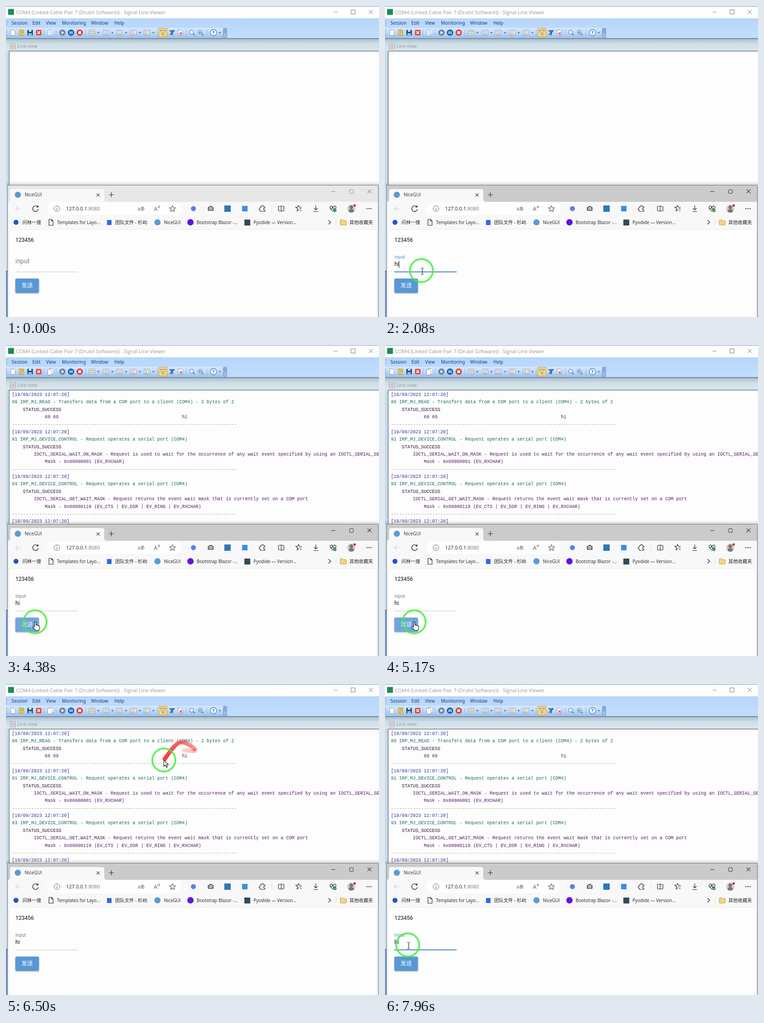
Animation of 820 by 683 pixels, one loop 8000 ms. Source, as an HTML page with a canvas:

```html
<!DOCTYPE html>
<html lang="en">
<head>
<meta charset="utf-8">
<title>Serial demo</title>
<style>
html, body { margin: 0; width: 100%; height: 100%; overflow: hidden; background: #fdfdfd; }
svg, canvas { position: absolute; left: 0; top: 0; width: 820px; height: 683px; display: block; }
text { white-space: pre; }
.ui { font-family: "Open Sans", "Noto Sans CJK SC", "Noto Sans CJK", sans-serif; }
.menu { font-family: "Noto Sans", sans-serif; }
.page { font-family: Roboto, "Noto Sans CJK SC", "Noto Sans CJK", sans-serif; }
.mono { font-family: "Liberation Mono", monospace; }
</style>
</head>
<body>
<svg id="stage" viewBox="0 0 820 683" xmlns="http://www.w3.org/2000/svg"></svg>
<canvas id="overlay" width="820" height="683"></canvas>
<script>
const LOOP = 8000, LOG_AT = 4250, TRAIL_LIFE = 450;
const BLUE = '#5898d4', INK = '#2b2b2b';

// Drawing helpers that return SVG markup
const rect = (x, y, w, h, fill, more = '') =>
  `<rect x="${x}" y="${y}" width="${w}" height="${h}" fill="${fill}" ${more}/>`;
const dot = (x, y, r, fill, more = '') => `<circle cx="${x}" cy="${y}" r="${r}" fill="${fill}" ${more}/>`;
const line = (d, stroke = INK, width = 1.2, more = '') =>
  `<path d="${d}" fill="none" stroke="${stroke}" stroke-width="${width}" ${more}/>`;
const shape = (d, fill, more = '') => `<path d="${d}" fill="${fill}" ${more}/>`;
const text = (x, y, str, size, fill, cls = 'ui', more = '') =>
  `<text x="${x}" y="${y}" font-size="${size}" fill="${fill}" class="${cls}" ${more}>${str}</text>`;
const at = (x, y, body, more = '') => `<g transform="translate(${x} ${y})" ${more}>${body}</g>`;

// Toolbar icons, each centred on 0,0
const sheet = shape('M-4.5-6H2L5-3V6H-4.5Z', '#fff', 'stroke="#8b98a8"');
const lens = line('M2.5 2.5L6 6', '#5a7ca8', 2) + dot(-1, -1, 4.3, '#e4f1fd', 'stroke="#5a86b8" stroke-width="1.2"');
const funnel = c => shape('M-6-5H6L1.5 0V6L-1.5 4V0Z', c, 'stroke="#4d6276" stroke-width=".8"');
const cross = (r, c, w) => line(`M${-r} ${-r}L${r} ${r}M${r} ${-r}L${-r} ${r}`, c, w);
const rows = (c, d = '') => rect(-6, -5.5, 12, 11, '#f6f8fa', 'stroke="#8d9aa5"') +
  line('M-4-3H4M-4-.5H4M-4 2H4M-4 4H4', c, 1, `stroke-dasharray="${d}"`);
const grid = rect(-6, -5.5, 12, 11, '#fff', 'stroke="#8c9d86"') + line('M-6-2H6M-6 2H6M-2-5V5M2-5V5', '#8c9d86', 1);

function monitorWindow() {
  const menu = [[12, 'Session'], [58, 'Edit'], [88, 'View'], [123, 'Monitoring'], [187, 'Window'], [238, 'Help']];
  const drops = [203, 234, 264, 294, 324, 470], seps = [83, 110, 175, 332, 396, 441];
  const icons = [
    [15, sheet],
    [34, rect(-5, -6, 10, 12, '#f6d568', 'stroke="#b79335"') + line('M-1-6V6M1-3H4M1 0H4', '#8d7427', 1)],
    [53, rect(-6, -6, 12, 12, '#17446f') + rect(-3, -6, 6, 4, '#dceafa') + rect(-4, 1, 8, 5, '#8fc3e8')],
    [72, rect(-6, -6, 12, 12, '#e8402c', 'rx="2"') + cross(3, '#fff', 2)],
    [124, dot(0, 0, 7, '#75879b') + shape('M-2-3.5L4 0L-2 3.5Z', '#fff')],
    [143, dot(0, 0, 7, '#1565ae') + line('M-2-3V3M2-3V3', '#fff', 2)],
    [162, dot(0, 0, 7, '#e5412f') + rect(-3, -3, 6, 6, '#fff')],
    [189, grid], [220, rows('#8d9aa5')], [249, rows('#777', '2 1')], [280, rows('#d66', '3 1')], [310, rows('#5a9b6a', '4 2')],
    [345, rect(-9, -9.5, 18, 19, '#fcd577', 'stroke="#c9a04a"') + funnel('#e8dfc0')],
    [365, funnel('#3d8ac4') + line('M-5 5L4-4', '#25507c', 1.5)],
    [383, sheet + at(1, 2, cross(2.5, '#d33', 1.6))],
    [409, lens], [428, lens + shape('M-3-3L2-1L-3 2Z', '#2f9a5b')],
    [456, dot(0, 0, 7, '#fff', 'stroke="#3f7fb5" stroke-width="1.3"') + text(-2.7, 4, '?', 11, '#2a6faa', 'ui', 'font-weight="700"')],
  ];
  return rect(0, 0, 820, 27, '#fefefe') + line('M0 .5H820', '#6d96c4', 1) +
    rect(4.5, 6.5, 13, 13, '#1f8a55', 'rx="1"') +
    text(22, 17.5, 'COM4 (Linked Cable Pair 7 (Drubil Software)) - Signal Line Viewer', 11, '#989898') +
    line('M720 13.5H729', '#8b8b8b', 1) + rect(758.5, 8.5, 9, 9, 'none', 'stroke="#777"') + at(802, 13, cross(4.5, '#777', 1)) +
    rect(0, 27, 820, 44, 'url(#bar)') + shape('M0 48H482Q486 48 486 53V70H0Z', 'url(#tools)') +
    rect(477, 48, 9, 22, '#82abdf', 'rx="3"') + line('M479 62H484M479 65L481.500 67.500L484 65', '#fff', 1) +
    line('M1.500 31V44M1.500 52V66', '#6f9ad2', 1.5, 'stroke-dasharray="2 2"') +
    menu.map(([x, s]) => text(x, 41, s, 10, '#173b75', 'menu')).join('') +
    seps.map(x => line(`M${x}.500 51V67`, '#94b8e4', 1)).join('') +
    icons.map(([x, body]) => at(x, 58.5, body)).join('') +
    at(98, 58.5, at(2, -1, sheet) + at(-2, 1, sheet), 'id="copy"') +
    drops.map(x => shape(`M${x - 2.5} 57.500h5l-2.500 3Z`, '#41618b')).join('') +
    rect(0, 71, 820, 612, '#c6dbe8') + rect(0, 72, 820, 27, 'url(#caption)') +
    line('M0 71.500H820', '#5b6f80', 1.6) +
    at(15, 88.500, rect(-5.500, -5.500, 11, 11, '#f3f3f0', 'stroke="#999"') + line('M-4-2.500H4M-4 0H4M-4 2.500H4', '#888', 1)) +
    text(25, 92, 'Line view', 10.4, '#94999c') +
    rect(7, 99, 820, 300, '#fdfdfd', 'stroke="#646a70" stroke-width="1.3"');
}

function serialLog() {
  const stamp = [0, '#2f359c', '[19/09/2023 12:07:20]'], rule = [0, '#8f8d70', '-'.repeat(82)];
  const ok = [4, '#24182c', 'STATUS_SUCCESS'], TEAL = '#176b62', PLUM = '#541b62';
  const control = n => [0, TEAL, n + ' IRP_MJ_DEVICE_CONTROL - Request operates a serial port (COM4)'];
  return [
    stamp, [0, TEAL, '89 IRP_MJ_READ - Transfers data from a COM port to a client (COM4) - 2 bytes of 2'], ok,
    [12, PLUM, '68 69' + ' '.repeat(45) + 'hi'], rule,
    stamp, control(91), ok,
    [8, PLUM, 'IOCTL_SERIAL_WAIT_ON_MASK - Request is used to wait for the occurrence of any wait event specified by using an IOCTL_SERIAL_SET_WAIT_MASK'],
    [12, PLUM, 'Mask - 0x00000001 (EV_RXCHAR)'], rule,
    stamp, control(93), ok,
    [8, PLUM, 'IOCTL_SERIAL_GET_WAIT_MASK - Request returns the event wait mask that is currently set on a COM port'],
    [12, PLUM, 'Mask - 0x00000119 (EV_CTS | EV_DSR | EV_RING | EV_RXCHAR)'], rule, stamp,
  ].map(([indent, fill, str], i) => text(13 + indent * 6.03, 112 + i * 16.37, str, 10.05, fill, 'mono')).join('');
}

function browserWindow() {
  const star = 'M0-6.500L1.900-2.200L6.500-1.800L3 1.300L4.100 6L0 3.500L-4.100 6L-3 1.300L-6.500-1.800L-1.900-2.200Z';
  const tools = [
    [27, line('M6 0H-6M-1-5L-6 0L-1 5', '#d0d0d0')],
    [65, line('M5-4A6.300 6.300 0 1 0 6.300 1M5.500-7V-3.500H2', INK, 1.4)],
    [112, dot(0, 0, 6.2, 'none', 'stroke="#666"') + line('M0-1V3.500M0-3.500V-2.200', '#666')],
    [297, text(-7.5, 3.5, 'aあ', 10, '#555')],
    [332, text(-7, 5, 'A', 12.5, '#555') + line('M2-6Q4-4 2-1M4.500-7Q7-4 4.500-1', '#555', 1)],
    [366, line(star, '#555', 1.1)],
    [412, dot(0, 0, 5.5, '#5680ee')],
    [450, rect(-6.5, -4, 13, 9, '#747474', 'rx="2"') + rect(-3, -6, 6, 3, '#747474') + dot(0, 0, 3, '#eee') + dot(0, 0, 1.6, '#747474')],
    [487, rect(-7, -7, 14, 14, '#2d78b8')],
    [525, rect(-6, -6, 12, 12, '#3b8ee6')],
    [564, line('M-5-4H-2Q-2.500-7 0-7T2-4H5V-1Q2-1.500 2 1T5 3V6H-5V3Q-8 3-7.500 1T-5-1Z')],
    [605, line('M-1-5H-5Q-6-5-6-4V4Q-6 5-5 5H-1M1-5H5Q6-5 6-4V4Q6 5 5 5H1M0-7V7')],
    [643, line('M1 2L-3 5L-2 0L-6-3H-2L0-7L2-3H7M2 0H7M3 4H7')],
    [681, line('M0-7V3M-4-1L0 3L4-1M-5 6.500H5')],
    [719, line('M0 6L-6 0Q-8-5-3-6L0-3L3-6Q8-5 6 0M-7 0H-3L-1-3L1 2L3 0H6') + dot(4, 4, 3.5, '#218a3d') + line('M2.500 4L3.700 5.200L5.700 3', '#fff', 1)],
    [759, dot(0, 0, 9, '#d0cdca') + dot(0, -3, 4, '#777') + shape('M-6 6.500Q-6 1 0 1T6 6.500Q0 11-6 6.500Z', '#777') + dot(7.500, -7, 2.6, '#d41f2c')],
    [798, dot(-4.500, 0, 1.2, INK) + dot(0, 0, 1.2, INK) + dot(4.500, 0, 1.2, INK)],
  ];
  const marks = [
    [36, '问林一搜'], [112, 'Templates for Layo...'], [240, '团队文件 - 杉屿'], [347, 'NiceGUI'],
    [419, 'Bootstrap Blazor -...'], [544, 'Pyodide — Version...'], [755, '其他收藏夹'],
  ];
  return rect(0, 582, 4, 101, '#6f94cc') + line('M0 582.500H3', '#333', 1) +
    rect(0, 385, 820, 9, 'url(#shade)') + rect(3, 394, 816, 290, '#f8f8f8') +
    rect(3, 394, 816, 36, '#cbcbcb', 'id="strip"') +
    line('M3.500 683V393.500H818.500V683', '#777', 1) +
    shape('M4 430Q9 430 9 424V407Q9 402 14 402H211Q216 402 216 407V424Q216 430 222 430Z', '#f8f8f8') +
    dot(26, 414.500, 6.8, '#5a9bd3') + text(41, 418, 'NiceGUI', 10, INK) + at(202.500, 415, cross(3.300, '#333', 1.1)) +
    line('M226 414.500H237M231.500 409V420', '#333', 1.2) +
    `<g id="controls">${line('M715 407.500H724', INK, 1) + rect(755.500, 403.500, 8, 8, 'none', `rx="1" stroke="${INK}"`) + at(799, 407, cross(4.200, INK, 1.1))}</g>` +
    rect(90, 431, 297, 28, '#fefefe', 'rx="14"') +
    text(132, 449, '127.0.0.1<tspan fill="#777">:8080</tspan>', 11, '#222') +
    line('M584.500 438V452M725.500 468V482', '#ddd', 1) +
    tools.map(([x, body]) => at(x, 445, body)).join('') +
    dot(22, 475, 5.500, '#2b4fd0') + at(99, 475, line('M-4.500-6.500H1L4.500-3V6.500H-4.500ZM1-6.500V-3H4.500', INK, 1.2)) +
    rect(222, 470, 10, 11, '#2f6be0') + dot(333, 475, 6.800, '#5a9bd3') + dot(405.500, 475, 7, '#6610e8') +
    rect(524, 469, 13, 13, '#344a55') + line('M709 470.500L714 475L709 479.500', INK, 1.3) +
    shape('M735 470.500Q735 469.500 736 469.500H740L742 471.500H747Q748 471.500 748 472.500V480Q748 481 747 481H736Q735 481 735 480Z', '#f8d57d', 'stroke="#b98a2c" stroke-width=".9"') +
    marks.map(([x, s]) => text(x, 479, s, /[\u4e00-\u9fff]/.test(s) ? 10.3 : 9.9, '#222')).join('') +
    rect(6.500, 490.500, 809, 220, '#fdfdfd', 'rx="6" stroke="#ebebe6"') +
    text(20.800, 517.500, '123456', 12, '#111', 'page');
}

const form = text(20.8, 0, 'input', 13.9, '#777', 'page', 'id="label"') +
  text(20.8, 571, '', 12, '#111', 'page', 'id="value"') +
  rect(20.5, 583.5, 137, 1, '#c9c9ab') + rect(20.5, 583, 137, 1.8, '#3f82c9', 'id="focusLine"') +
  rect(21, 560, 1, 15, '#111', 'id="caret"') +
  `<g id="button">${rect(20.5, 598.5, 52, 31.5, BLUE, 'rx="3" filter="url(#lift)"')}</g>` +
  text(34, 618, '发送', 12.5, '#fff', 'page');

const gradient = (id, ...stops) => `<linearGradient id="${id}" x2="0" y2="1">${
  stops.map(([o, c, a = 1]) => `<stop offset="${o}" stop-color="${c}" stop-opacity="${a}"/>`).join('')}</linearGradient>`;
document.getElementById('stage').innerHTML = '<defs>' +
  gradient('bar', [0, '#b7d6fa'], [1, '#c3defc']) +
  gradient('tools', [0, '#d6e8ff'], [.5, '#c0dafb'], [1, '#9dc0ee']) +
  gradient('caption', [0, '#a9bfcc'], [.4, '#cfdee7'], [1, '#d9e7ef']) +
  gradient('shade', [0, '#777', 0], [1, '#777', .3]) +
  '<filter id="lift" x="-20%" y="-20%" width="140%" height="150%"><feDropShadow dx="0" dy="1.5" stdDeviation="1.3" flood-opacity=".32"/></filter></defs>' +
  monitorWindow() + `<g id="log">${serialLog()}</g>` + browserWindow() + form;

// Pointer path: time, x, y, trail width
const path = [
  [100, 560, 720], [240, 420, 660, 6], [360, 220, 605, 4], [460, 100, 570], [560, 86, 567], [700, 86, 567],
  [880, 80, 581], [2150, 80, 581], [2480, 64, 608], [5180, 64, 608],
  [5300, 180, 500, 5], [5410, 350, 350, 8], [5520, 428, 260, 8], [5660, 436, 205, 8], [5790, 418, 152, 8],
  [5870, 405, 130, 9], [5960, 387, 145, 9], [6120, 387, 145, 9],
  [6240, 418, 146, 9], [6370, 382, 128, 9], [6490, 347, 167, 9], [6600, 347, 167, 13],
  [6680, 372, 190, 11], [6750, 417, 146, 8], [6790, 345, 168, 2], [6835, 267, 190, 6], [6850, 233, 223],
  [6870, 161, 289], [6885, 133, 320, 8], [6900, 117, 354], [6910, 97, 400], [6935, 72, 490, 5], [6960, 72, 542, 7],
  [7130, 58, 592], [7330, 50, 573], [8000, 50, 573],
];
const clicks = [[560, 86, 567], [3360, 64, 607], [7400, 50, 573]];

function pointer(t) {
  const i = Math.max(1, path.findIndex(p => p[0] >= t));
  const a = path[i - 1], b = path[i], before = path[i - 2] || a, after = path[i + 1] || b;
  const u = Math.max(0, (t - a[0]) / (b[0] - a[0]));
  const still = a[1] === b[1] && a[2] === b[2];
  const curve = k => still ? a[k] : a[k] + .5 * u * (b[k] - before[k] +
    u * (2 * before[k] - 5 * a[k] + 4 * b[k] - after[k] + u * (3 * (a[k] - b[k]) + after[k] - before[k])));
  const wa = a[3] || 0, wb = b[3] || 0;
  return { x: curve(1), y: curve(2), w: wa + (wb - wa) * u };
}

const ctx = document.getElementById('overlay').getContext('2d');
const overButton = p => p.x > 20 && p.x < 73 && p.y > 598 && p.y < 631;
const overInput = p => p.x > 18 && p.x < 158 && p.y > 538 && p.y < 590;

function drawTrail(t) {
  const step = 6;
  for (let s = Math.max(100, t - TRAIL_LIFE); s < t; s += step) {
    const a = pointer(s), b = pointer(Math.min(t, s + step));
    const dx = b.x - a.x, dy = b.y - a.y, len = Math.hypot(dx, dy);
    if (len < .05 || a.w + b.w < .5) continue;
    const nx = -dy / len / 2, ny = dx / len / 2;
    ctx.fillStyle = `rgba(246,32,32,${1 - (t - s) / TRAIL_LIFE})`;
    ctx.beginPath();
    ctx.moveTo(a.x + nx * a.w, a.y + ny * a.w);
    ctx.lineTo(b.x + nx * b.w, b.y + ny * b.w);
    ctx.lineTo(b.x - nx * b.w, b.y - ny * b.w);
    ctx.lineTo(a.x - nx * a.w, a.y - ny * a.w);
    ctx.fill();
  }
}

function ring(x, y, r, width, color) {
  ctx.strokeStyle = color;
  ctx.lineWidth = width;
  ctx.beginPath();
  ctx.arc(x, y, r, 0, 7);
  ctx.stroke();
}

const arrow = new Path2D('M0 0V14L3.300 11L5.600 16L8 15L5.700 10H10Z');
const hand = new Path2D('M-1 1Q0-1 2 1V7Q4 6 5 8Q7 7 7.500 9Q10 8 10 11V14Q9 17 8 19H1Q-2 15-5 12Q-5 9-1 11Z');
const beam = new Path2D('M-1-6.500H1.300M2.700-6.500H5M2-6V7M-1 7.500H1.300M2.700 7.500H5');

function drawCursor(p) {
  ctx.save();
  ctx.translate(p.x, p.y);
  ctx.lineWidth = 1.1;
  ctx.strokeStyle = '#111';
  ctx.fillStyle = '#fff';
  if (overInput(p)) {
    ctx.translate(0, 1);
    ctx.stroke(beam);
  } else {
    const icon = overButton(p) ? hand : arrow;
    ctx.fill(icon);
    ctx.stroke(icon);
  }
  ctx.restore();
}

function drawPointer(t) {
  ctx.clearRect(0, 0, 820, 683);
  if (t < 100) return;
  const p = pointer(t);
  drawTrail(t);
  ring(p.x, p.y, 25.3, 4.2, 'rgba(70,236,62,.8)');
  for (const [start, x, y] of clicks) {
    const u = (t - start) / 500;
    if (u >= 0 && u < 1) ring(x, y, 6 + 14 * u, 6 - 4 * u, `rgba(232,24,48,${1 - .95 * u})`);
  }
  drawCursor(p);
}

const el = Object.fromEntries([...document.querySelectorAll('[id]')].map(e => [e.id, e]));
const set = (id, attrs) => Object.entries(attrs).forEach(([k, v]) => el[id].setAttribute(k, v));
const ease = u => 1 - (1 - Math.min(1, Math.max(0, u))) ** 3;

function drawForm(t) {
  const [first, send, again] = clicks.map(c => c[0]);
  const focused = (t >= first && t < send + 40) || t >= again;
  const value = t < 1790 ? '' : t < 1950 ? 'h' : 'hi';
  const lift = ease((t - first) / 360);
  const blinkFrom = t >= again ? again : t >= 1950 ? 1950 : t >= 1790 ? 1790 : first;
  const grow = 137 * ease((t - (t >= again ? again : first)) / 300);
  set('label', { y: 565 - 10.2 * lift, 'font-size': 13.9 - 3.5 * lift, fill: focused ? BLUE : '#808080' });
  el.value.textContent = value;
  set('focusLine', { x: 89 - grow / 2, width: grow, opacity: focused ? 1 : 0 });
  set('caret', { x: 20.8 + [0, 6.8, 9.6][value.length], opacity: focused && (t - blinkFrom) % 1060 < 530 ? 1 : 0 });
  set('button', { opacity: t > 100 && overButton(pointer(t)) ? .86 : 1 });
  const active = t >= first;
  set('strip', { fill: active ? '#cbcbcb' : '#e7e7e8' });
  set('controls', { opacity: active ? 1 : .5 });
}

function frame(now) {
  const t = now % LOOP;
  drawForm(t);
  set('log', { opacity: t >= LOG_AT ? 1 : 0 });
  set('copy', { opacity: t >= LOG_AT ? 1 : .45 });
  drawPointer(t);
  requestAnimationFrame(frame);
}
frame(performance.now());
</script>
</body>
</html>
```
